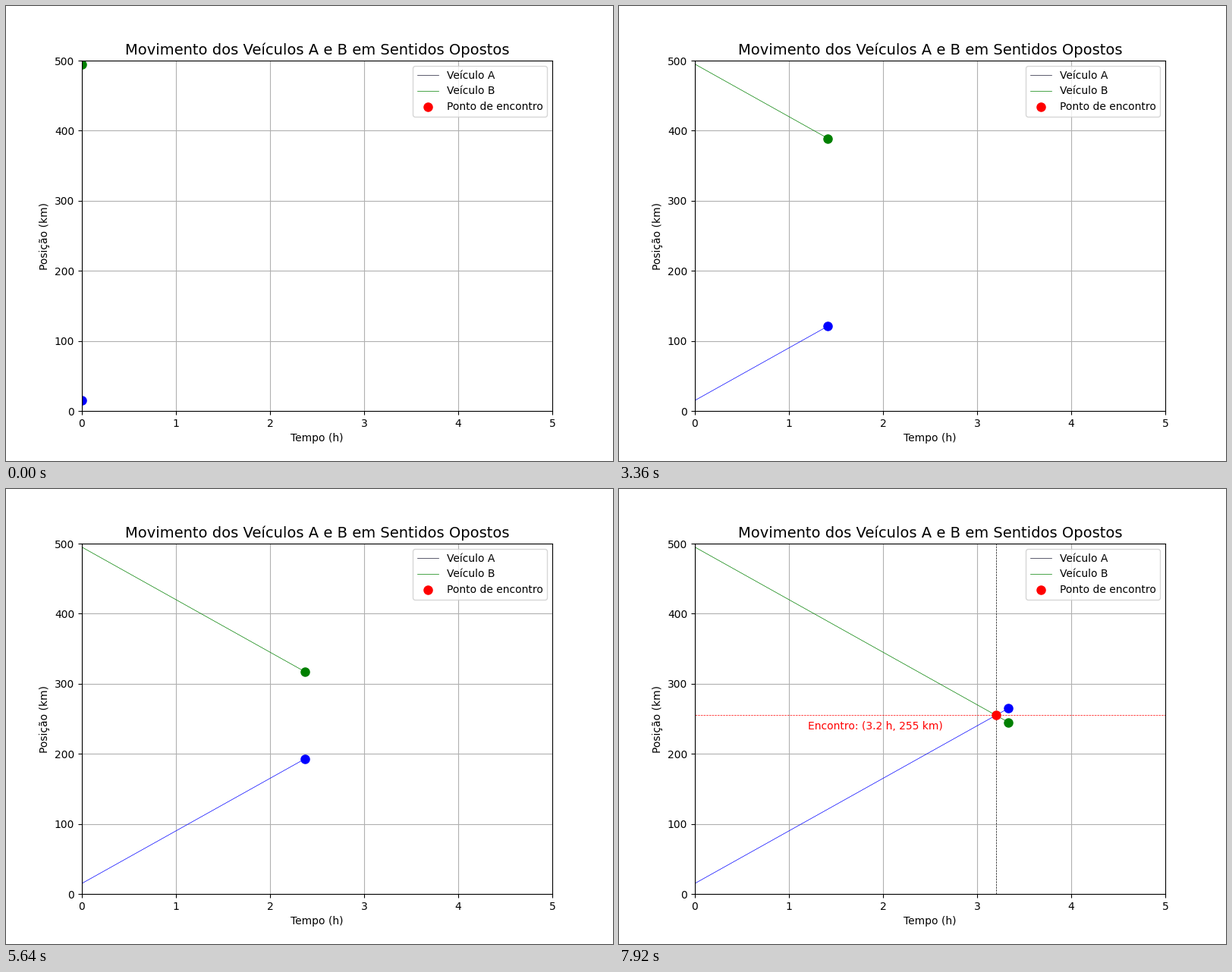
Recreate the animation shown at these times as a matplotlib script. Size 800 by 600 pixels, loop 8 s.

```python
import numpy as np
import matplotlib.pyplot as plt
from matplotlib.animation import FuncAnimation

LOOP_MS = 8000
INTERVAL = 40
HOLD = 3  # ticks per step: 120 ms
THIN = 0.5

SPEED = 75
START_A, START_B = 15, 495
MEET_T = (START_B - START_A) / (2 * SPEED)
MEET_X = START_A + SPEED * MEET_T

times = np.linspace(0, 5, 100)
pos_a = START_A + SPEED * times
pos_b = START_B - SPEED * times

fig, ax = plt.subplots(figsize=(8, 6), dpi=100)
ax.set_xlim(0, 5)
ax.set_ylim(0, 500)
ax.set_xlabel("Tempo (h)")
ax.set_ylabel("Posição (km)")
ax.set_title("Movimento dos Veículos A e B em Sentidos Opostos", fontsize=14)
ax.grid(True)


def dot(color, **kw):
    return ax.plot([], [], "o", color=color, markersize=8, **kw)[0]


line_a, = ax.plot([], [], color="blue", lw=THIN, label="Veículo A")
line_b, = ax.plot([], [], color="green", lw=THIN, label="Veículo B")
meet_lines = [
    ax.axvline(MEET_T, color="black", ls="--", lw=THIN),
    ax.axhline(MEET_X, color="red", ls="--", lw=THIN),
]
dot_a = dot("blue")
dot_b = dot("green")
meet_dot = dot("red", label="Ponto de encontro")
meet_text = ax.text(MEET_T - 2, MEET_X - 20,
                    f"Encontro: ({MEET_T:.1f} h, {MEET_X:.0f} km)",
                    color="red")

legend = ax.legend(loc="upper right")
legend.legend_handles[0].set_color("#1a1a33")


def update(tick):
    k = tick // HOLD
    for line, mark, pos in ((line_a, dot_a, pos_a), (line_b, dot_b, pos_b)):
        line.set_data(times[:k + 1], pos[:k + 1])
        mark.set_data([times[k]], [pos[k]])

    met = times[k] >= MEET_T
    meet_dot.set_data(([MEET_T], [MEET_X]) if met else ([], []))
    for artist in (*meet_lines, meet_text):
        artist.set_visible(met)
    return line_a, line_b, dot_a, dot_b, meet_dot, meet_text, *meet_lines


anim = FuncAnimation(fig, update, frames=LOOP_MS // INTERVAL,
                     interval=INTERVAL, repeat=True, repeat_delay=0,
                     init_func=lambda: update(0), blit=False)
plt.show()
```
